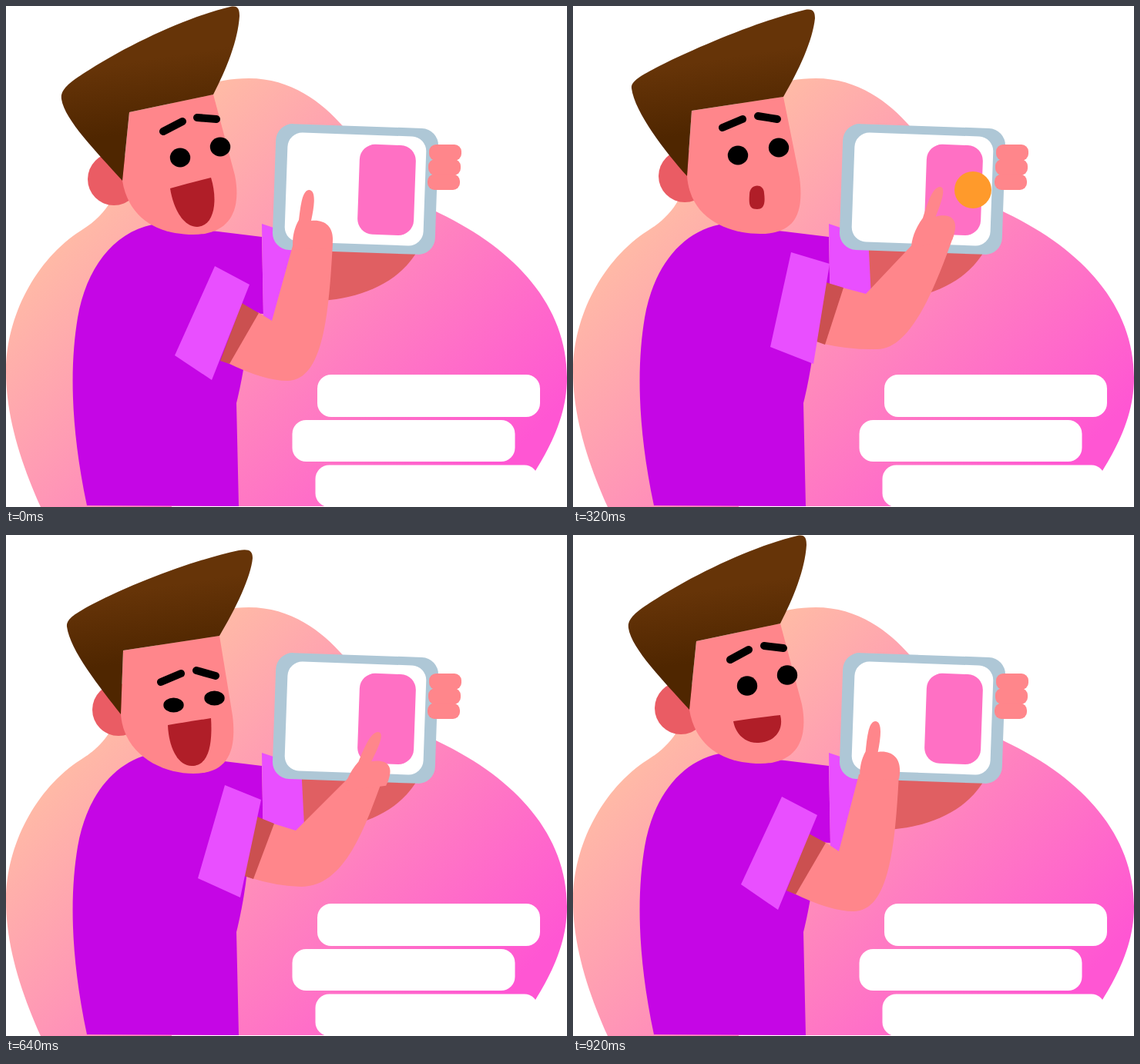
An HTML page for the animation above (0.96 s loop, 728x651 px).

```html
<!DOCTYPE html>
<html lang="en">
<head>
<meta charset="utf-8">
<title>Swipe on a tablet</title>
<style>
  html, body { margin: 0; width: 100%; height: 100%; overflow: hidden; background: #fff; }
  svg { display: block; width: 100vw; height: 100vh; }
</style>
</head>
<body>
<svg viewBox="0 0 728 651">
  <defs>
    <linearGradient id="sky" gradientUnits="userSpaceOnUse" x1="190" y1="190" x2="620" y2="620">
      <stop stop-color="#ffbaa6"/><stop offset="1" stop-color="#ff56d3"/>
    </linearGradient>
    <linearGradient id="brown" gradientUnits="userSpaceOnUse" x1="180" y1="70" x2="194" y2="160">
      <stop stop-color="#663408"/><stop offset="1" stop-color="#4f2600"/>
    </linearGradient>
    <clipPath id="case">
      <rect x="348" y="156" width="211" height="164" rx="22" transform="rotate(2 453.5 238)"/>
    </clipPath>
  </defs>

  <path fill="url(#sky)" d="M45 651C20 595 0 535 0 475C0 403 39 329 97 292C148 260 140 230 170 180C200 125 250 94 315 94C370 94 410 125 437 156C470 200 505 240 562 269C662 317 728 390 728 483C728 530 708 570 687 604L655 651Z"/>
  <g fill="#fff">
    <rect x="404" y="479" width="289" height="55" rx="18"/>
    <rect x="371.500" y="538" width="289" height="54" rx="18"/>
    <rect x="401.500" y="596.500" width="289" height="54.500" rx="18"/>
  </g>

  <path fill="#c506e5" d="M190 284C138 295 104 342 93 405C83 465 83 545 105 649L302 650L299 516C308 480 314 440 316 399L334 400L332 300L275 293Z"/>
  <rect x="215" y="650" width="513" height="1" fill="#fff"/>
  <path fill="#e05f62" d="M376 300L380 384C440 385 500 370 531 323V300Z"/>
  <path fill="#e94fff" d="M332 283L383 300L389 418L334 412Z"/>

  <ellipse id="ear" rx="34" ry="34" fill="#ea5c64"/>
  <path id="face" fill="#ff868b"/>
  <path id="hair" fill="url(#brown)"/>
  <ellipse id="eyeL" rx="13.200"/>
  <ellipse id="eyeR" rx="13.200"/>
  <path id="brows" fill="none" stroke="#000" stroke-width="10" stroke-linecap="round"/>
  <path id="mouth" fill="#b01e28"/>

  <g transform="rotate(2 453.5 238)">
    <rect x="348" y="156" width="211" height="164" rx="22" fill="#aec7d6"/>
    <rect x="363.500" y="167" width="180" height="142" rx="19" fill="#fff"/>
    <rect x="457.500" y="179" width="73" height="117" rx="20" fill="#ff70c4"/>
  </g>
  <g clip-path="url(#case)"><circle id="ball" fill="#ff9a2b"/></g>
  <g fill="#ff868b">
    <rect x="549" y="180" width="42" height="21" rx="9"/>
    <rect x="548" y="199" width="42" height="21" rx="9"/>
    <rect x="547" y="218.500" width="42" height="20.500" rx="9"/>
    <path id="arm"/>
    <path id="hand" d="M-20 78C-22 68 -21 53 -13 39C-11 23 -9 1 0 0C9 0 8 17 3 40C21 38 32 48 31 66C31 70 30 73 30 75Z"/>
  </g>
  <path id="shade" fill="#cb5050"/>
  <path id="sleeve" fill="#e94fff"/>
</svg>

<script>
const LOOP = 960, STEP = 40;
const $ = id => document.getElementById(id);
const set = (id, attrs) => {
  for (const k in attrs) $(id).setAttribute(k, attrs[k]);
};

// Cyclic monotone cubic through poses, given as {time: "numbers or path"}.
function track(poses) {
  const times = Object.keys(poses).map(Number);
  const n = times.length;
  const vals = times.map(t => poses[t].match(/-?[\d.]+/g).map(Number));
  const gap = i => (times[(i + 1) % n] - times[i] + LOOP) % LOOP;
  const slope = (i, k) => (vals[(i + 1) % n][k] - vals[i][k]) / gap(i);
  const tangent = (i, k) => {
    const a = slope((i + n - 1) % n, k), b = slope(i, k);
    return a * b <= 0 ? 0 : 2 * a * b / (a + b);
  };
  return t => {
    let i = n - 1;
    while (times[i] > t) i--;
    const j = (i + 1) % n, h = gap(i), u = (t - times[i]) / h, w = 1 - u;
    return vals[i].map((a, k) =>
      a * w * w * (1 + 2 * u) + vals[j][k] * u * u * (3 - 2 * u) +
      h * u * w * (w * tangent(i, k) - u * tangent(j, k)));
  };
}

// Same, but fills the numbers back into the path.
function morph(poses) {
  const at = track(poses), shape = poses[0];
  return t => {
    const v = at(t);
    let k = 0;
    return shape.replace(/-?[\d.]+/g, () => v[k++].toFixed(2));
  };
}

const hairA = 'M72 121C70 108 84 98 108 83C166 46 240 13 291 1C301 -1 303 4 303 13C301 45 286 82 269 115L160 138L151 227C118 190 76 148 72 121Z';
const faceA = 'M160 138L269 115L297 220C306 266 290 297 243 297C205 297 160 282 151 227Z';
const openA = 'M213 237C231 232 249 227 266 223C275 252 271 286 248 287C230 287 217 263 213 237Z';
const browsA = 'M204 163L229 150M248 145L273 147';

const paths = {
  hair: morph({
    0: hairA, 160: hairA,
    320: 'M76 107C75 98 87 91 112 78C170 49 250 17 301 5C312 3 314 8 314 16C311 45 293 84 273 118L154 136L148 221C120 190 80 138 76 107Z',
    560: 'M82 104C82 98 92 92 112 83C180 56 260 29 310 18C322 16 327 18 327 29C325 52 303 92 279 128L149 143L147 223C120 190 85 138 82 104Z',
    640: 'M79 119C78 109 90 102 112 90C172 59 250 31 302 20C315 18 320 20 320 30C318 54 298 96 277 131L152 150L149 233C122 198 83 150 79 119Z',
    800: hairA
  }),
  face: morph({
    0: faceA, 160: faceA,
    320: 'M154 136L273 118L294 223C300 270 288 296 243 296C202 296 152 277 148 221Z',
    560: 'M149 143L279 128L291 228C296 280 280 305 247 305C205 306 152 283 147 223Z',
    640: 'M152 150L277 131L294 235C300 285 285 310 243 310C203 310 153 286 149 233Z',
    800: faceA
  }),
  mouth: morph({
    0: openA, 160: openA,
    320: 'M229 245C229 230 248 230 248 243C250 258 247 264 239 264C229 264 228 258 229 245Z',
    560: 'M190 233C213 234 236 234 258 234C259 246 246 253 226 253C204 253 191 245 190 233Z',
    640: 'M210 247C228 244 247 241 266 238C268 270 264 300 241 300C222 300 211 274 210 247Z',
    800: 'M234 246C233 231 252 230 253 244C255 259 252 264 244 264C234 265 233 259 234 246Z',
    920: 'M208 242C228 239 249 236 269 234C274 253 262 269 241 270C224 271 211 259 208 242Z'
  }),
  brows: morph({
    0: browsA, 160: browsA,
    320: 'M194 158L220 147M240 143L265 147',
    560: 'M189 168L216 158M236 156L261 162',
    640: 'M201 191L227 180M247 176L272 183',
    800: 'M202 159L226 142M246 137L272 144',
    920: 'M204 162L228 149M248 144L273 147'
  }),
  sleeve: morph({
    0: 'M271 338L316 362L267 486L219 454Z',
    160: 'M274 336L319 360L274 484L223 452Z',
    320: 'M283 320L333 335L312 465L256 443Z',
    560: 'M286 315L334 325L325 457L268 439Z',
    640: 'M284 325L331 344L304 471L249 446Z',
    800: 'M275 347L317 375L260 493L213 457Z',
    920: 'M271 340L317 364L266 487L218 454Z'
  }),
  shade: morph({
    0: 'M306 386L328 399L290 465L278 461Z',
    160: 'M310 383L330 394L294 461L284 457Z',
    320: 'M328 359L351 366L327 440L316 436Z',
    560: 'M333 350L357 355L339 431L327 428Z',
    640: 'M326 366L348 375L321 447L309 443Z',
    800: 'M308 396L326 409L282 474L271 468Z',
    920: 'M306 388L328 400L289 467L277 462Z'
  }),
  // Cuff, inner elbow, both sides of the wrist, outer elbow.
  arm: morph({
    0: 'M327 398L345 409L373 308L424 308C419 400 412 487 365 487Q335 487 288 464Z',
    160: 'M329 393L351 405L384 300L434 304C426 405 415 482 372 482Q340 481 292 460Z',
    320: 'M350 366L380 374L447 303L494 298C472 360 440 446 395 446Q360 447 325 439Z',
    560: 'M356 355L388 361L483 299L538 304C490 370 447 433 390 433Q360 433 337 430Z',
    640: 'M347 375L376 384L445 315L491 311C466 380 440 457 383 457Q350 456 319 446Z',
    800: 'M325 408L343 421L365 330L416 326C412 400 410 500 357 500Q325 498 280 473Z',
    920: 'M327 399L345 411L371 311L423 311C418 402 411 489 364 489Q334 489 287 466Z'
  })
};

const ear = track({
  0: '140 225', 160: '140 225', 320: '145 221', 560: '151 221', 640: '146 227', 800: '142 228', 920: '140 225'
});
const eyes = track({
  0: '226 197 278 183 12.5', 160: '226 197 278 183 12.5', 320: '214 194 267 184 12.5',
  560: '207 205 260 198 12.5', 640: '217.5 221 270.5 212 9.5', 800: '224 190 276 176 13.5',
  920: '226 196 278 182 12.7'
});
// Fingertip, turn and skew.
const hand = track({
  0: '393 239 0 0', 160: '398 239 -4 0', 320: '475 235 11 -20', 560: '544 234 28 -15',
  640: '482 256 16 -20', 800: '377 257 -8 0', 920: '392 242 -1 0'
});
const ball = track({
  0: '395 242 0', 40: '395 242 0', 120: '395 242 24', 160: '395 242 24',
  320: '519 239 24', 400: '590 238 24', 440: '590 238 0'
});

function draw(t) {
  for (const id in paths) set(id, { d: paths[id](t) });
  const [ex, ey] = ear(t);
  set('ear', { cx: ex, cy: ey });
  const [lx, ly, rx, ry, tall] = eyes(t);
  set('eyeL', { cx: lx, cy: ly, ry: tall });
  set('eyeR', { cx: rx, cy: ry, ry: tall });
  const [hx, hy, turn, skew] = hand(t);
  set('hand', { transform: `translate(${hx} ${hy}) rotate(${turn}) skewY(${skew})` });
  const [bx, by, r] = ball(t);
  set('ball', { cx: bx, cy: by, r: Math.max(0, r) });
}

const start = performance.now();
function tick() {
  draw(Math.floor((performance.now() - start) / STEP) * STEP % LOOP);
  requestAnimationFrame(tick);
}
tick();
</script>
</body>
</html>
```
